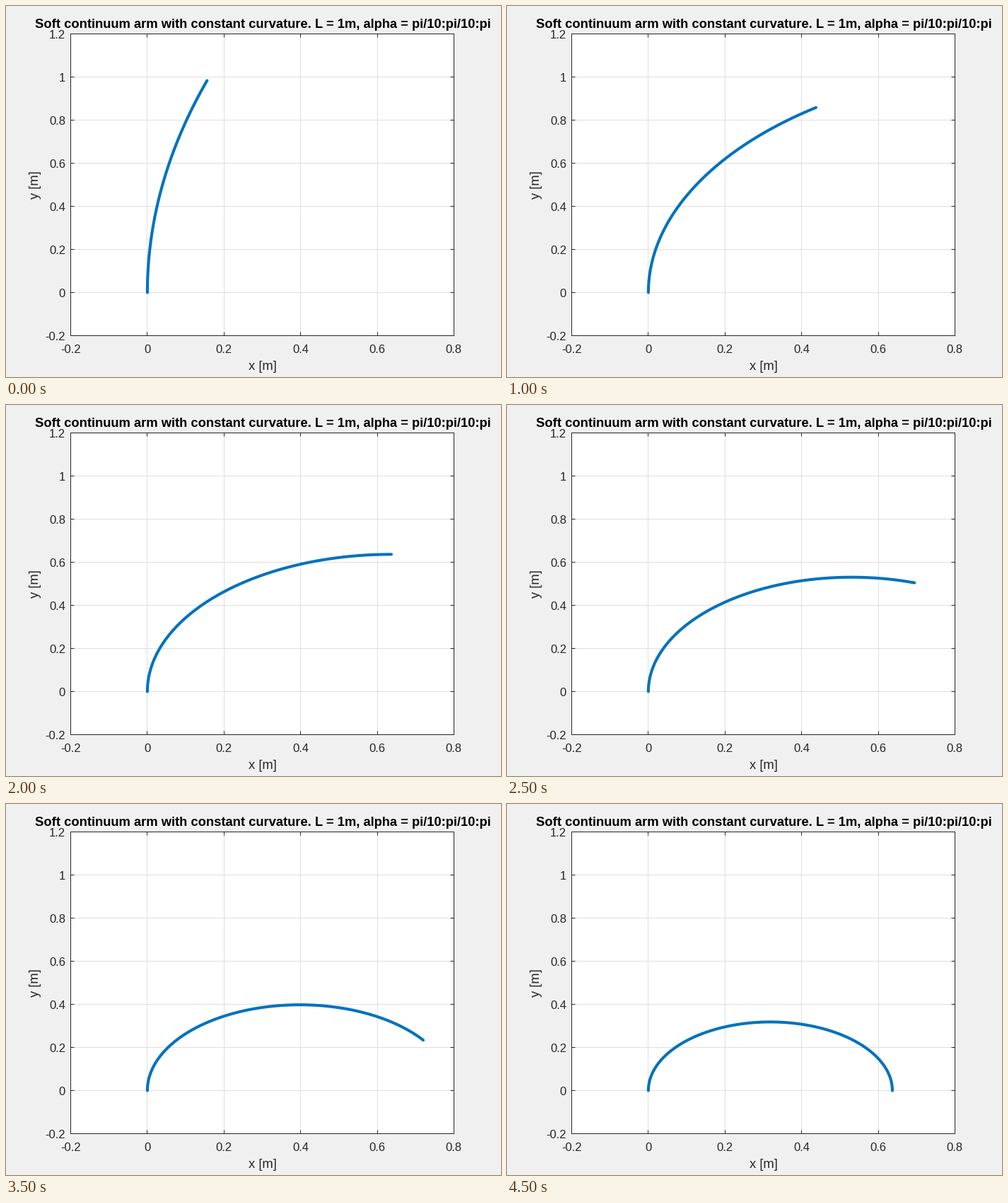
A matplotlib script for the animation above (5 s loop, 700 by 525 pixels).

```python
import numpy as np
import matplotlib.pyplot as plt
from matplotlib.animation import FuncAnimation
from matplotlib.transforms import ScaledTranslation

W, H, DPI = 700, 525, 120
LEFT, RIGHT, TOP, BOTTOM = 91, 633, 39, 466
INK = "#262626"
STEPS = 10

plt.rcParams["font.family"] = "Liberation Sans"
fig = plt.figure(figsize=(W / DPI, H / DPI), dpi=DPI, facecolor="#f0f0f0")


def px(n):
    """Pixels to points."""
    return n * 72 / DPI


def label(x, y, text, size=10, **kw):
    """Text with its baseline at pixel (x, y), measured from the top left."""
    kw = {"ha": "center", "va": "baseline", "color": INK, **kw}
    fig.text(x / W, 1 - y / H, text, fontsize=size, **kw)


ax = fig.add_axes([LEFT / W, 1 - BOTTOM / H,
                   (RIGHT - LEFT) / W, (BOTTOM - TOP) / H])
ax.set(xlim=(-0.2, 0.8), ylim=(-0.2, 1.2))
xticks = np.arange(-1, 5) / 5
yticks = np.arange(-1, 7) / 5
ax.set_xticks(xticks)
ax.set_yticks(yticks)
ax.tick_params(direction="in", top=True, right=True, length=px(5.4),
               width=px(1), color=INK, labelbottom=False, labelleft=False)
ax.grid(color="#dfdfdf", linewidth=px(1))
ax.set_axisbelow(True)
for spine in ax.spines.values():
    spine.set(color=INK, linewidth=px(1))

for v in xticks:
    label(LEFT + (v + 0.2) * (RIGHT - LEFT) + 0.3, 491, f"{v:g}")
for v in yticks:
    y = BOTTOM - (v + 0.2) / 1.4 * (BOTTOM - TOP)
    label(84, y + 7, f"{v:g}", ha="right")

label(363.2, 31, "Soft continuum arm with constant curvature. "
      "L = 1m, alpha = pi/10:pi/10:pi", 11, weight="bold", color="black")
label(363, 515, "x [m]", 11)
label(50, 253, "y [m]", 11, rotation=90, ha="right", va="center")

# Grid lines snap to whole pixels; the arm runs through pixel centres.
half = ScaledTranslation(0.5 / DPI, -0.5 / DPI, fig.dpi_scale_trans)
arm, = ax.plot([], [], color="#0072bd", linewidth=px(4.1),
               solid_capstyle="round", solid_joinstyle="round", zorder=5,
               transform=ax.transData + half)
s = np.linspace(0, 1, 201)


def draw(i):
    alpha = (i + 1) * np.pi / STEPS
    arm.set_data((1 - np.cos(alpha * s)) / alpha, np.sin(alpha * s) / alpha)
    return arm,


anim = FuncAnimation(fig, draw, frames=STEPS, interval=500,
                     repeat=True, repeat_delay=0)
plt.show()
```
